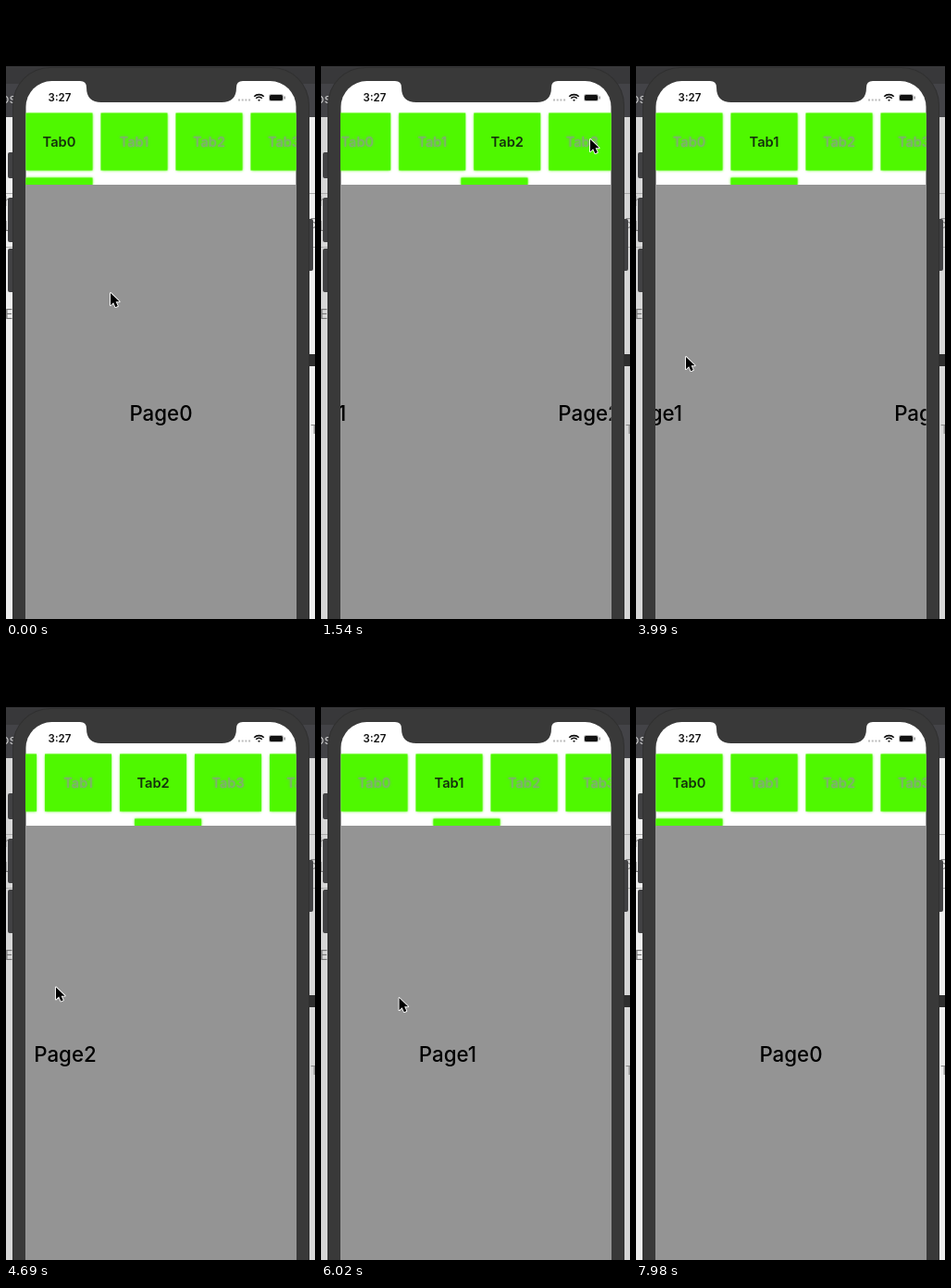
Animation, 334 px wide and 662 px high, one loop 8.12 s. Source, as an HTML page with a canvas:

```html
<!DOCTYPE html>
<html lang="en">
<head>
<meta charset="utf-8">
<title>Tabbed pages</title>
<style>
html, body { margin: 0; height: 100%; overflow: hidden; background: #000; }
canvas { display: block; }
</style>
</head>
<body>
<canvas id="stage" width="334" height="662"></canvas>
<script>
const c = document.getElementById('stage').getContext('2d');
const LOOP = 8120, STEP = 70, LAST = 7980;
const LEFT = 21, RIGHT = 313.5, MID = 167.5, PAGE_W = 294;
const TAB_W = 73, PITCH = 81, COUNT = 5, MAX_SCROLL = 105;
const MARK_LEAD = 30, GREEN = '#4ff800', FRAME = '#393939';

// Page turns: start, duration, target page, delay of the tab bar
const turns = [
  [700, 280, 1, 0], [1415, 350, 3, 0], [2030, 280, 4, 0], [2499, 350, 2, 55],
  [3080, 350, 1, 70], [3849, 280, 2, 170], [4550, 350, 3, 70], [5113, 400, 2, 10],
  [5740, 350, 1, 70], [6300, 350, -0.007, 70], [6800, 130, 0, 0]
];

// Pointer stops: time, x, y
const stops = [
  [0, 113, 310], [700, 138, 150], [1330, 291, 144], [1610, 291, 144],
  [2030, 276, 148], [2499, 83, 153], [2730, 83, 153], [3080, 90, 379],
  [3430, 235, 379], [3780, 215, 379], [3990, 54, 379], [5110, 54, 362],
  [5460, 126, 362], [6300, 70, 385], [6720, 166, 632], [6860, 166, 680]
];

const arrow = new Path2D('M0 0V15L3.6 11.6L6.1 17.2L8.9 16L6.4 10.6H11Z');
const clamp = (v, a, b) => Math.min(b, Math.max(a, v));
const mix = (a, b, u) => a + (b - a) * u;
const ease = (t, start, length) => {
  const u = clamp((t - start) / length, 0, 1);
  return u * u * (3 - 2 * u);
};

// Position after all turns; lag(delay) shifts each turn in time
const position = (t, lag) => turns.reduce((p, [start, length, target, delay]) =>
  mix(p, target, ease(t - lag(delay), start, length)), 0);

function pointerAt(t) {
  const i = stops.findIndex(s => s[0] > t);
  const [t0, x0, y0] = stops[i - 1], [t1, x1, y1] = stops[i];
  const u = ease(t, t0, t1 - t0);
  return [mix(x0, x1, u), mix(y0, y1, u)];
}

function rect(x, y, w, h, color) {
  c.fillStyle = color;
  c.fillRect(x, y, w, h);
}

function round(x, y, w, h, r, color) {
  c.fillStyle = color;
  c.beginPath();
  c.roundRect(x, y, w, h, r);
  c.fill();
}

function text(str, x, y, size, weight, color, align = 'center') {
  c.font = `${weight} ${size}px Inter, "Liberation Sans", sans-serif`;
  c.textAlign = align;
  c.fillStyle = color;
  c.fillText(str, x, y);
}

function glow(color, blur, paint) {
  c.shadowColor = color;
  c.shadowBlur = blur;
  paint();
  c.shadowBlur = 0;
}

function backdrop(t) {
  const light = Math.max(1 - t / 840, (t - 7490) / 490, 0);
  const g = mix(214, 238, light);
  rect(0, 0, 334, 662, `rgb(${g},${g},${g})`);
  rect(0, 0, 334, 65, '#000');
  rect(0, 65, 334, 19, '#38383a');
  rect(0, 84, 334, 36, '#434347');
  for (const y of [202, 260]) rect(0, y, 334, 1, '#aaa');
  text('os', -5, 105, 14, 400, '#c8c8c8', 'left');
  text('h', -2, 216, 14, 400, '#777', 'left');
  text('L', -2, 243, 14, 400, '#777', 'left');
  text('DE', -11, 338, 14, 400, '#777', 'left');
  text('5', 328, 240, 14, 400, '#888', 'left');
  text('T', 329, 462, 13, 400, '#888', 'left');
  rect(328, 376, 6, 13, '#2e2e2e');
}

function phone() {
  for (const [y, h] of [[158, 28], [207, 48], [262, 47]]) round(2, y, 8, h, 2, '#414143');
  round(324, 230, 8, 56, 2, '#414143');
  round(7, 66, 321, 660, 41, '#303030');
  round(8, 67, 319, 660, 40, FRAME);
  round(LEFT + .5, 81, RIGHT - LEFT - .5, 660, 28, '#fff');
}

function notch() {
  c.fillStyle = FRAME;
  c.fill(new Path2D('M80 80V81Q87 81 87 88Q87 104 103 104H233Q249 104 249 88Q249 81 256 81V80Z'));
}

function status() {
  text('3:27', 58, 103, 11.5, 600, '#111');
  for (let i = 0; i < 4; i++) rect(251 + i * 3.7, 100.5, 2, 2, '#bbb');
  c.strokeStyle = '#111';
  c.lineWidth = 1.7;
  for (const r of [1.2, 4.6, 7.4]) {
    c.beginPath();
    c.arc(273.5, 103, r, -Math.PI * .75, -Math.PI * .25);
    c.stroke();
  }
  round(284, 95, 16, 8, 2.5, '#bbb');
  round(285, 96, 14, 6, 1.5, '#111');
  rect(300.5, 97.5, 1.3, 3, '#888');
}

function content(t) {
  const page = position(t, () => 0);
  const bar = position(t, delay => delay);
  const mark = position(t, delay => delay - MARK_LEAD);
  const tabX = i => LEFT + i * PITCH;
  const centred = tabX(bar) + TAB_W / 2 - MID;
  const scroll = clamp(centred, 0, MAX_SCROLL);
  c.save();
  c.beginPath();
  c.rect(LEFT, 106, RIGHT - LEFT, 556);
  c.clip();
  for (let i = 0; i < COUNT; i++) {
    const x = tabX(i) - scroll, label = 'Tab' + i;
    glow(GREEN, 3, () => rect(x + .5, 115.5, TAB_W - 1, 62, GREEN));
    if (i === Math.round(bar)) text(label, x + TAB_W / 2, 152, 14.7, 600, '#14310c');
    else glow('#7fae72', 3, () => text(label, x + TAB_W / 2, 152, 14.7, 500, '#7fb06e'));
  }
  glow(GREEN, 3, () => rect(tabX(mark) - scroll + .5, 185.5, TAB_W - 1, 8, GREEN));
  rect(LEFT + .5 + Math.max(0, -page * PAGE_W), 193, 300, 469, '#949494');
  for (let i = 0; i < COUNT; i++)
    text('Page' + i, MID + (i - page) * PAGE_W, 448, 22.3, 500, '#000');
  c.restore();
}

function cursor(t) {
  if (t >= stops[stops.length - 1][0]) return;
  c.save();
  c.translate(...pointerAt(t));
  c.scale(.88, .88);
  c.lineWidth = 2;
  c.lineJoin = 'round';
  c.strokeStyle = '#fff';
  c.stroke(arrow);
  c.fillStyle = '#000';
  c.fill(arrow);
  c.restore();
}

function draw(now) {
  const t = Math.min(Math.floor(now % LOOP / STEP) * STEP, LAST);
  backdrop(t);
  phone();
  content(t);
  notch();
  status();
  cursor(t);
  requestAnimationFrame(draw);
}
draw(performance.now());
</script>
</body>
</html>
```
